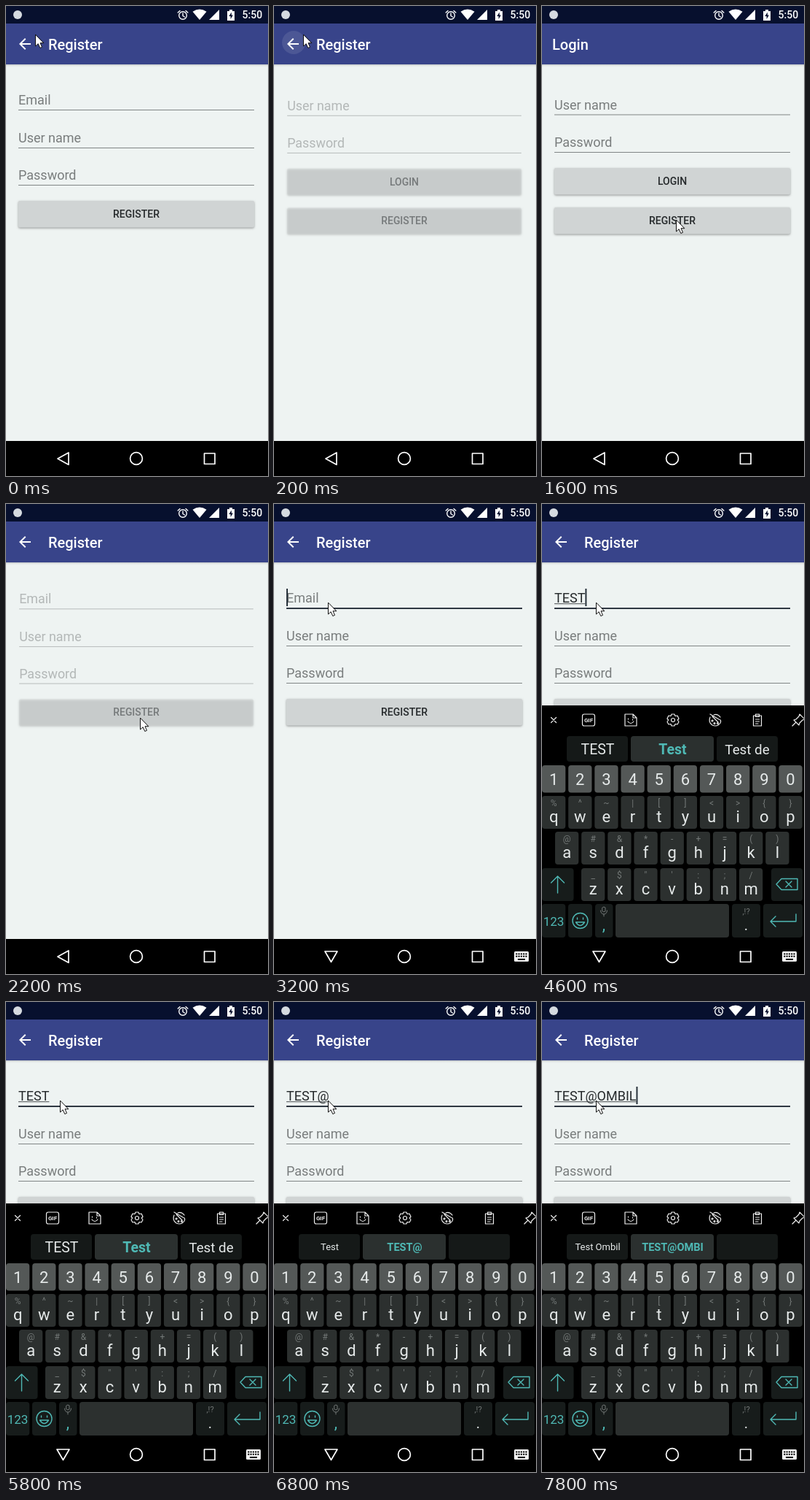
Write an HTML page with a canvas that moves like this. It is 360 by 644 pixels and loops after 8 s.

```html
<!DOCTYPE html>
<html lang="en">
<head>
<meta charset="utf-8">
<title>Register form</title>
<style>
html, body { margin: 0; width: 100%; height: 100%; overflow: hidden; background: #000; }
canvas { display: block; width: 360px; height: 644px; }
</style>
</head>
<body>
<canvas id="stage"></canvas>
<script>
const W = 360, H = 644, LOOP = 8000, TICK = 200;
const canvas = document.getElementById('stage');
const ctx = canvas.getContext('2d');
const ratio = window.devicePixelRatio || 1;
canvas.width = W * ratio;
canvas.height = H * ratio;

const INK = '#25292b', HINT = '#797d7d', TEAL = '#4fb9b5', PALE = '#e6eaea';
const ENTRY = 'TEST@OMBIL';

// [time, characters typed]
const TYPING = [[4000, 1], [4200, 2], [4400, 3], [4600, 4], [6200, 5],
  [7200, 6], [7400, 7], [7600, 9], [7800, 10]];
const CARET_OFF = [[3800, 4000], [5000, 5400], [5800, 6200], [6800, 7200]];
// [time, x, y] of the mouse pointer
const POINTER = [[0, 40, 39], [600, 72, 44], [800, 106, 47], [1000, 113, 176],
  [1200, 168, 236], [1400, 179, 274], [1600, 184, 293], [2400, 192, 288],
  [2600, 194, 238], [2800, 122, 214], [3000, 74, 135]];

const latest = (list, t) => list.filter(e => e[0] <= t).pop();

function text(str, x, y, size, color, { weight = 400, align = 'left' } = {}) {
  ctx.font = `${weight} ${size}px Roboto, "Noto Sans", sans-serif`;
  ctx.textAlign = align;
  ctx.textBaseline = 'alphabetic';
  ctx.fillStyle = color;
  ctx.fillText(str, x, y);
  return ctx.measureText(str).width;
}

const center = (str, x, y, size, color, weight = 400) =>
  text(str, x, y, size, color, { weight, align: 'center' });

function rect(x, y, w, h, color) {
  ctx.fillStyle = color;
  ctx.fillRect(x, y, w, h);
}

function rounded(x, y, w, h, r, color) {
  ctx.beginPath();
  ctx.roundRect(x, y, w, h, r);
  ctx.fillStyle = color;
  ctx.fill();
}

function disc(x, y, r, color) {
  ctx.beginPath();
  ctx.arc(x, y, r, 0, Math.PI * 2);
  ctx.fillStyle = color;
  ctx.fill();
}

function at(x, y, d, { fill, stroke, width = 1.2 } = {}) {
  const path = new Path2D(d);
  ctx.save();
  ctx.translate(x, y);
  if (fill) { ctx.fillStyle = fill; ctx.fill(path); }
  if (stroke) {
    ctx.lineWidth = width;
    ctx.lineJoin = ctx.lineCap = 'round';
    ctx.strokeStyle = stroke;
    ctx.stroke(path);
  }
  ctx.restore();
}

const circlePath = (x, y, r) =>
  `M${x - r} ${y}a${r} ${r} 0 1 0 ${2 * r} 0a${r} ${r} 0 1 0 ${-2 * r} 0`;

function statusBar() {
  rect(0, 0, W, 24, '#07102e');
  disc(16, 12, 6, '#d5dae0');
  at(243, 13, circlePath(0, 0, 5.3) + 'M0 -3V0.5L2.5 2M-6.8 -4L-4 -6.6M6.8 -4L4 -6.6',
    { stroke: '#fff', width: 1.4 });
  at(266, 19, 'M0 0L-9.5 -11.3Q0 -17.5 9.5 -11.3Z', { fill: '#fff' });
  at(279, 19, 'M0 0H14V-14Z', { fill: '#fff' });
  at(304, 5, 'M3 0H7V2H10V15H0V2H3Z', { fill: '#fff' });
  at(304, 5, 'M5.8 3.5L2.3 9H4.6V13L7.9 7.5H5.8Z', { fill: '#07102e' });
  text('5:50', 324.5, 17, 14, '#fff', { weight: 500 });
}

function toolbar(title, hasBack, ripple) {
  rect(0, 24, W, 56, '#38448a');
  if (ripple) disc(27, 50, 16, 'rgba(255,255,255,.1)');
  if (hasBack) {
    at(14, 40, 'M20 11H7.83l5.59-5.59L12 4l-8 8 8 8 1.41-1.41L7.83 13H20z', { fill: '#fff' });
  }
  text(title, hasBack ? 58 : 14, 60, 20, '#fff', { weight: 500 });
  const shade = ctx.createLinearGradient(0, 80, 0, 83);
  shade.addColorStop(0, 'rgba(0,0,0,.16)');
  shade.addColorStop(1, 'rgba(0,0,0,0)');
  rect(0, 80, W, 3, shade);
}

function field(hint, base, { value = '', focus = false, caret = false } = {}) {
  let end = 17;
  if (value) {
    const w = text(value, 17, base, 18, INK);
    rect(17, base + 1.2, w, 1, '#4a4e50');
    end += w;
  } else {
    text(hint, 17, base, 18, HINT);
  }
  if (focus) rect(17, base + 7, 324, 2, '#2f3742');
  else rect(17, base + 7, 324, 1, '#818686');
  if (caret) rect(end, 116, 2, 24, '#27313a');
}

function button(label, y, pressed) {
  ctx.save();
  ctx.shadowColor = 'rgba(0,0,0,.38)';
  ctx.shadowBlur = (pressed ? 7 : 3) * ratio;
  ctx.shadowOffsetY = (pressed ? 2 : 1) * ratio;
  rounded(17, y, 324, 36.5, 2, pressed ? '#bcc0c0' : '#d0d4d4');
  ctx.restore();
  center(label, 179, y + 23, 14, INK, 500);
}

function loginPage(pressed) {
  field('User name', 141.5);
  field('Password', 193);
  button('LOGIN', 222);
  button('REGISTER', 276, pressed);
}

function registerPage(email) {
  field('Email', 135, email);
  field('User name', 187);
  field('Password', 238);
  button('REGISTER', 267);
}

// A page entering: half faded in and slightly smaller
function entering(page) {
  ctx.save();
  ctx.globalAlpha = 0.5;
  ctx.translate(179, 330);
  ctx.scale(0.993, 0.993);
  ctx.translate(-179, -330);
  page();
  ctx.restore();
}

function navBar(typing) {
  rect(0, 596, W, 48, '#000');
  const line = { stroke: '#fff', width: 1.7 };
  at(0, 0, typing ? 'M70 613H87L78.5 627.5Z' : 'M86 612V628.5L71 620.2Z', line);
  at(179, 620, circlePath(0, 0, 8.4), line);
  at(272.5, 613, 'M0 0H14.5V14.5H0Z', line);
  if (!typing) return;
  rounded(330, 613, 20, 14, 1.5, '#f2f2f2');
  for (let r = 0; r < 2; r++) {
    for (let c = 0; c < 5; c++) rect(332.3 + c * 3.3, 615.5 + r * 3.3, 2, 2, '#000');
  }
  rect(335, 623, 10, 2, '#000');
}

function suggestions(word) {
  const name = s => s.charAt(0) + s.slice(1).toLowerCase();
  if (!word) return ['que', 'si', 'I'];
  const [user, host] = word.split('@');
  if (host === undefined) return [word, name(word), name(word) + ' de'];
  return [(name(user) + ' ' + name(host)).trim(), word.slice(0, 9), ''];
}

function key(x, y, w, label, hint, h = 45, color = '#2c302f') {
  rounded(x, y, w, h, 4, color);
  const mid = x + w / 2;
  if (hint) center(hint, mid, y + 14, 12, '#737877');
  if (label) center(label, mid, y + (hint ? 36 : h / 2 + 8), 22, PALE);
}

function keyRow(x, y, keys, hints) {
  [...keys].forEach((k, i) => key(x + i * 36.15, y, 32.3, k, hints[i]));
}

function keyTools() {
  const line = { stroke: '#eee', width: 1.2 };
  at(16, 296, 'M-3.5 -3.5L3.5 3.5M3.5 -3.5L-3.5 3.5', line);
  at(64, 296, 'M-6 -8H6Q8.5 -8 8.5 -5.5V5.5Q8.5 8 6 8H-6Q-8.5 8 -8.5 5.5V-5.5Q-8.5 -8 -6 -8Z', line);
  center('GIF', 64, 299, 8, '#eee', 700);
  at(122, 296, 'M-8 -8H3L8 -3V8H-8ZM3 -8V-3H8M-4 2Q0 7 4 2M-3.5 -2V-1M2.5 -1V0', line);
  at(180, 296, 'M-2 -8H2L3 -5.5L6 -6L8 -2L6.3 0L8 2.5L6 6L3 5.5L2 8H-2L-3 5.5L-6 6L-8 2.5L-6.3 0L-8 -2L-6 -6L-3 -5.5Z'
    + circlePath(0, 0, 2.5), line);
  at(238, 296, 'M-7 -4Q-10 3 -4 7Q3 10 7 4Q9 0 5 -1L-7 -8M-2 -7Q3 -9 7 -4M-4 -5L4 3'
    + circlePath(-4, 1, 1) + circlePath(-1, 4.5, 1) + circlePath(3.5, 4.5, 1), line);
  at(296, 296, 'M-5.5 -6H5.5V8H-5.5ZM-2.5 -8H2.5V-4.5H-2.5ZM-2.5 -1H2.5M-2.5 2H2.5M-2.5 5H1', line);
  at(352, 296, 'M2 -8L9 -1L6 0L2 4L1 7L-6 0L-3 -1L1 -5ZM-3 3L-8 8', line);
}

function keyboard(word) {
  rect(0, 276, W, 320, '#000');
  keyTools();

  const [left, main, right] = suggestions(word);
  const small = word.includes('@');
  rounded(34, 318, 84, 35, 4, '#151918');
  rounded(122, 318, 114, 35, 4, '#2b302f');
  rounded(240, 318, 84, 35, 4, '#151918');
  const size = small ? 13 : 19.5, base = small ? 340 : 342.5;
  center(left, 76.5, base, size, PALE);
  center(main, 179.5, small ? 341 : 342.5, small ? 14.6 : 19.5, TEAL, 700);
  center(right, 282, base, right.length > 5 ? 18.8 : size, PALE);

  [...'1234567890'].forEach((k, i) => key(i * 36.15, 358, 32.3, k, '', 37.5, '#545857'));
  keyRow(0, 400, 'qwertyuiop', '%^~|[]<>{}');
  keyRow(18, 449, 'asdfghjkl', '@#&*-+=()');
  keyRow(54, 499, 'zxcvbnm', '_$"\':;/');

  const dark = '#171c1b', line = { stroke: TEAL, width: 1.4 };
  key(0, 499, 43.5, '', '', 45, dark);
  at(21.5, 521, 'M0 12V-11M-9 -2L0 -11L9 -2', line);
  key(315, 499, 43, '', '', 45, dark);
  at(337, 521, 'M-15 0L-8 -7.5H14V7.5H-8ZM-2 -4L6 4M6 -4L-2 4', line);

  key(0, 548, 32.3, '', '', 46, dark);
  center('123', 16, 577.5, 17, TEAL);
  key(36, 548, 33, '', '', 46, dark);
  at(52.5, 571, circlePath(0, 0, 10.5) + 'M-6 2Q0 11 6 2ZM-4 -4V-2M4 -4V-2', line);
  key(73, 548, 24.5, '', '', 46, dark);
  at(85, 558, 'M-2 -5Q0 -7 2 -5V0Q0 2 -2 0ZM-4.5 -1Q-4 4 0 4Q4 4 4.5 -1M0 4V7', { stroke: '#737877', width: 1 });
  center(',', 85, 584, 22, TEAL);
  key(101, 548, 156, '', '', 46);
  key(261, 548, 39, '', '', 46, dark);
  center(',!?', 280.5, 562, 11, '#737877');
  center('.', 280.5, 584, 20, PALE);
  key(304, 548, 54, '', '', 46, dark);
  at(331, 571, 'M18 -9V1H-17M-10 -6L-17 1L-10 8', line);
}

function pointer(x, y) {
  at(x + 0.5, y + 0.5, 'M0 0V15.5L3.7 12.2L6.3 18L9 16.8L6.5 11.2H11Z',
    { fill: '#fff', stroke: '#111', width: 1 });
}

function draw(t) {
  const leaving = t === 200;
  const onLogin = t >= 200 && t < 2200;
  const focus = t >= 3000;
  const typed = latest(TYPING, t);
  const value = ENTRY.slice(0, typed ? typed[1] : 0);
  const caret = focus && !CARET_OFF.some(([a, b]) => t >= a && t < b);

  ctx.setTransform(ratio, 0, 0, ratio, 0, 0);
  rect(0, 0, W, H, '#eef3f2');
  const page = onLogin ? () => loginPage(t === 2000) : () => registerPage({ value, focus, caret });
  if (leaving || t === 2200) entering(page);
  else page();

  statusBar();
  const register = !onLogin || leaving;
  toolbar(register ? 'Register' : 'Login', register, leaving);
  if (t >= 3800) keyboard(value);
  navBar(t >= 3200);
  const [, x, y] = latest(POINTER, t);
  pointer(x, y);
}

function loop() {
  const t = performance.now() % LOOP;
  draw(Math.floor(t / TICK) * TICK);
  requestAnimationFrame(loop);
}
loop();
</script>
</body>
</html>
```
